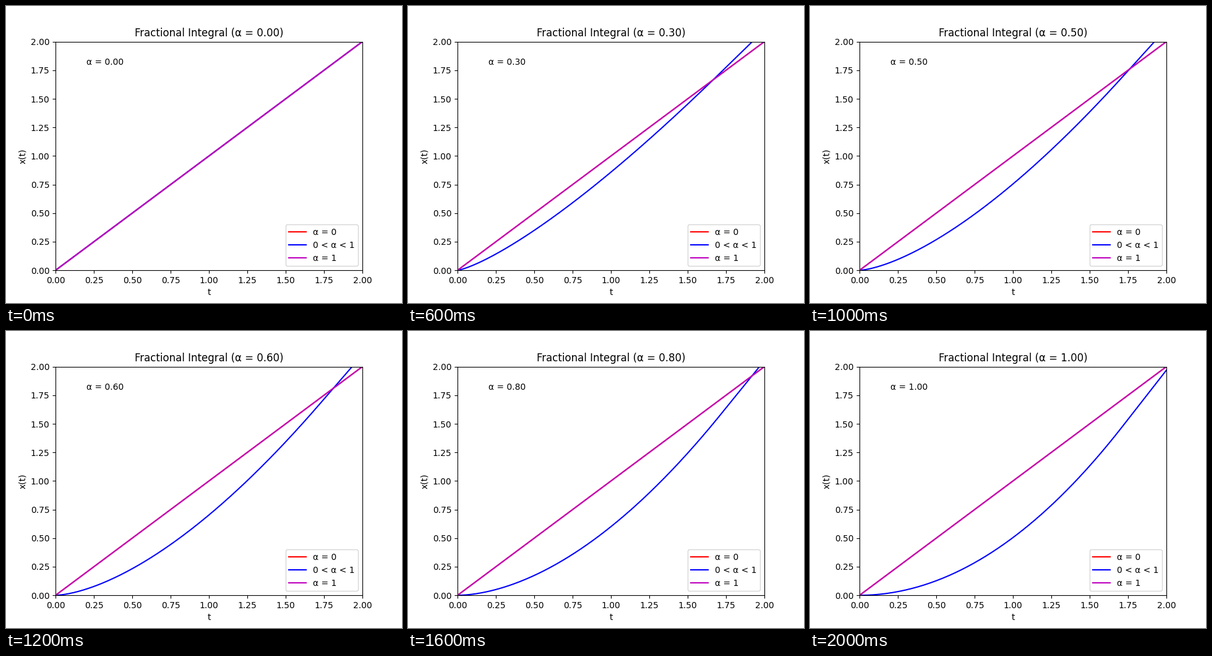
Write a matplotlib script that moves like this. It is 640x480 px and loops after 2.1 s.

```python
import numpy as np
import matplotlib.pyplot as plt
from matplotlib.animation import FuncAnimation

STEPS = 21
MEMORY = 171  # number of past samples kept in the sum

plt.rcParams["font.family"] = "DejaVu Sans"

t = np.linspace(0, 2, 200)
h = t[1] - t[0]


def frac_integral(x, alpha):
    """Grünwald-Letnikov integral of order alpha with a short memory."""
    k = np.arange(1, MEMORY)
    weights = np.concatenate(([1.0], np.cumprod((k - 1 + alpha) / k)))
    return h**alpha * np.convolve(x, weights)[:len(x)]


fig, ax = plt.subplots(figsize=(6.4, 4.8), dpi=100)
ax.set_xlim(0, 2)
ax.set_ylim(0, 2)
ax.set_xlabel("t")
ax.set_ylabel("x(t)")

ax.plot(t, t, "r", label="α = 0")
curve, = ax.plot(t, t, "b", label="0 < α < 1")
ax.plot(t, t, "m", label="α = 1")
ax.legend(loc="lower right")

title = ax.set_title("")
note = ax.text(0.2, 1.8, "")


def update(i):
    alpha = i / (STEPS - 1)
    curve.set_ydata(frac_integral(t, alpha))
    title.set_text(f"Fractional Integral (α = {alpha:.2f})")
    note.set_text(f"α = {alpha:.2f}")
    return curve, title, note


anim = FuncAnimation(fig, update, frames=STEPS, interval=100,
                     repeat=True, repeat_delay=0)
plt.show()
```
